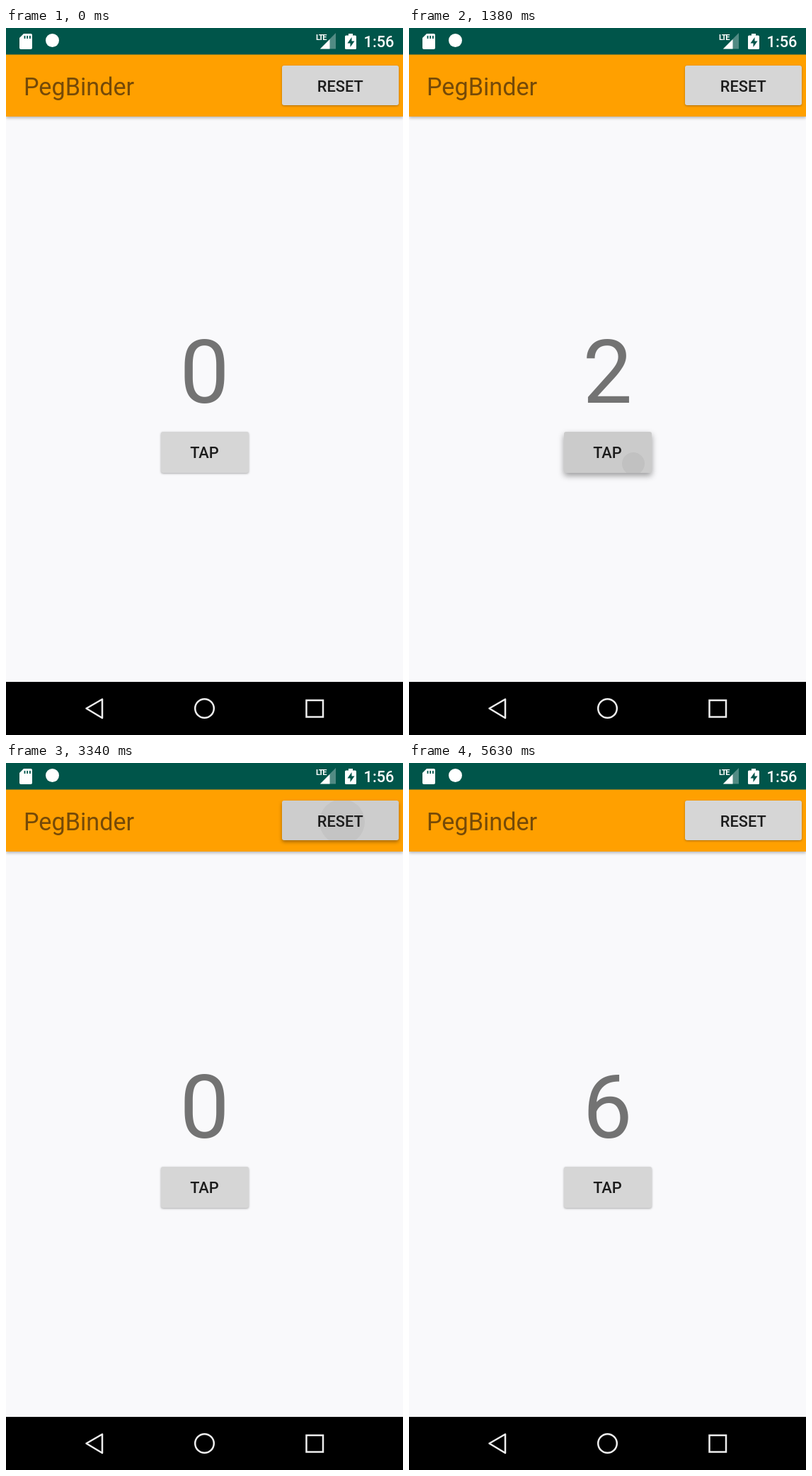
Write an HTML page that moves like this. It is 561 px wide and 998 px high and loops after 5670 ms.

```html
<!DOCTYPE html>
<html lang="en">
<head>
<meta charset="utf-8">
<title>Tap counter</title>
<style>
  html, body { margin: 0; width: 100%; height: 100%; overflow: hidden; }
  body { position: relative; background: #f9f9fb; font-family: Roboto, "Liberation Sans", sans-serif; }
  .toolbar { position: absolute; left: 0; top: 37px; width: 561px; height: 88px;
    background: #ffa000; box-shadow: 0 2px 4px rgba(0, 0, 0, .28); }
  svg { position: absolute; left: 0; top: 0; }
  .button { position: absolute; overflow: hidden; border-radius: 3px; background: #d6d6d6; }
  .button i { position: absolute; inset: 0; background: #000; opacity: 0; }
  .button b { position: absolute; border-radius: 50%; background: #000; opacity: 0; }
  #reset { left: 390px; top: 53px; width: 165px; height: 56px; }
  #tap { left: 218.5px; top: 570px; width: 124.5px; height: 57.5px; }
  text { white-space: pre; }
  .label { font-size: 21.8px; font-weight: 500; fill: #1c1c1c; text-anchor: middle; }
</style>
</head>
<body>
<div class="toolbar"></div>
<div class="button" id="reset"><i></i><b></b></div>
<div class="button" id="tap"><i></i><b></b></div>

<svg width="561" height="998" viewBox="0 0 561 998">
  <rect width="561" height="37.5" fill="#00554a"/>
  <rect y="923" width="561" height="75"/>

  <!-- status bar -->
  <g fill="#fff">
    <path d="M25 8h10q2 0 2 2v18q0 2-2 2H21q-2 0-2-2V14z"/>
    <path d="M26.5 11v4M30.2 11v4M33.9 11v4" stroke="#00554a" stroke-width="1.8"/>
    <circle cx="65.5" cy="17.5" r="9.5"/>
    <text x="438" y="17" font-size="11" font-weight="700" letter-spacing="-1.2">LTE</text>
    <path d="M466 7v22.500h-22.500z" opacity=".32"/>
    <path d="M457.500 16v13.500H444z"/>
    <path d="M484 8h6v2.500h3.500q1.500 0 1.500 1.500v16.500q0 1.500-1.500 1.500h-13q-1.500 0-1.500-1.500V12q0-1.500 1.500-1.500H484z"/>
    <path d="M488.500 13l-6 8.500h4V27l6-8.500h-4z" fill="#00554a"/>
    <text x="505.500" y="27" font-size="21.8" font-weight="500">1:56</text>
  </g>

  <text x="25" y="95" font-size="34.2" fill="#754a08">PegBinder</text>
  <text class="label" x="472.300" y="89.500">RESET</text>
  <text class="label" x="280.500" y="606.500">TAP</text>
  <text id="count" x="280.500" y="528.500" font-size="124.7" fill="#737373" text-anchor="middle">0</text>

  <!-- navigation bar -->
  <g fill="none" stroke="#eee" stroke-width="2.5" stroke-linejoin="round">
    <path d="M113.500 960.500L136 947.500v26.500z"/>
    <circle cx="280.500" cy="960.500" r="13.300"/>
    <rect x="424.500" y="949" width="23.500" height="23.500" stroke-linejoin="miter"/>
  </g>
</svg>

<script>
const LOOP = 5670;
const STEP = 180;
const RESET_AT = 3290;
const count = document.getElementById("count");

// x, y are inside the button; speed is ripple growth in px per ms
const presses = [
  { id: "tap", down: 1170, up: 2630, x: 98.5, y: 45, speed: .107, max: 84 },
  { id: "reset", down: 3200, up: RESET_AT, x: 85, y: 30, speed: .4, max: 95 },
  { id: "tap", down: 4080, up: 5020, x: 91.5, y: 18, speed: .107, max: 84 }
];

const clamp = v => Math.max(0, Math.min(1, v));

function counterAt(t) {
  let n = 0;
  for (const p of presses) {
    if (t < p.down) break;
    if (p.id === "tap") n = Math.floor((Math.min(t, p.up) - p.down) / STEP) + 1;
    else if (t >= p.up) n = 0;
  }
  return n;
}

function drawButton(id, t) {
  const el = document.getElementById(id);
  const [glow, ripple] = el.children;
  const p = presses.find(q => q.id === id && t >= q.down && t < q.up + 450);
  let lift = 0, fade = 0;
  if (p) {
    const grow = clamp((t - p.down) / 100);
    lift = grow * (1 - clamp((t - p.up) / 100));
    fade = grow * (1 - clamp((t - p.up) / 400));
    const r = Math.min(p.max, Math.max(0, t - p.down - 60) * p.speed);
    ripple.style.left = p.x - r + "px";
    ripple.style.top = p.y - r + "px";
    ripple.style.width = ripple.style.height = 2 * r + "px";
  }
  glow.style.opacity = ripple.style.opacity = .05 * fade;
  el.style.boxShadow =
    `0 ${1 + 3 * lift}px ${3 + 5 * lift}px rgba(0,0,0,${.32 + .06 * lift})`;
}

function render(t) {
  count.textContent = counterAt(t);
  drawButton("tap", t);
  drawButton("reset", t);
}

let start;
function tick(now) {
  start ??= now;
  render((now - start) % LOOP);
  requestAnimationFrame(tick);
}
render(0);
requestAnimationFrame(tick);
</script>
</body>
</html>
```
